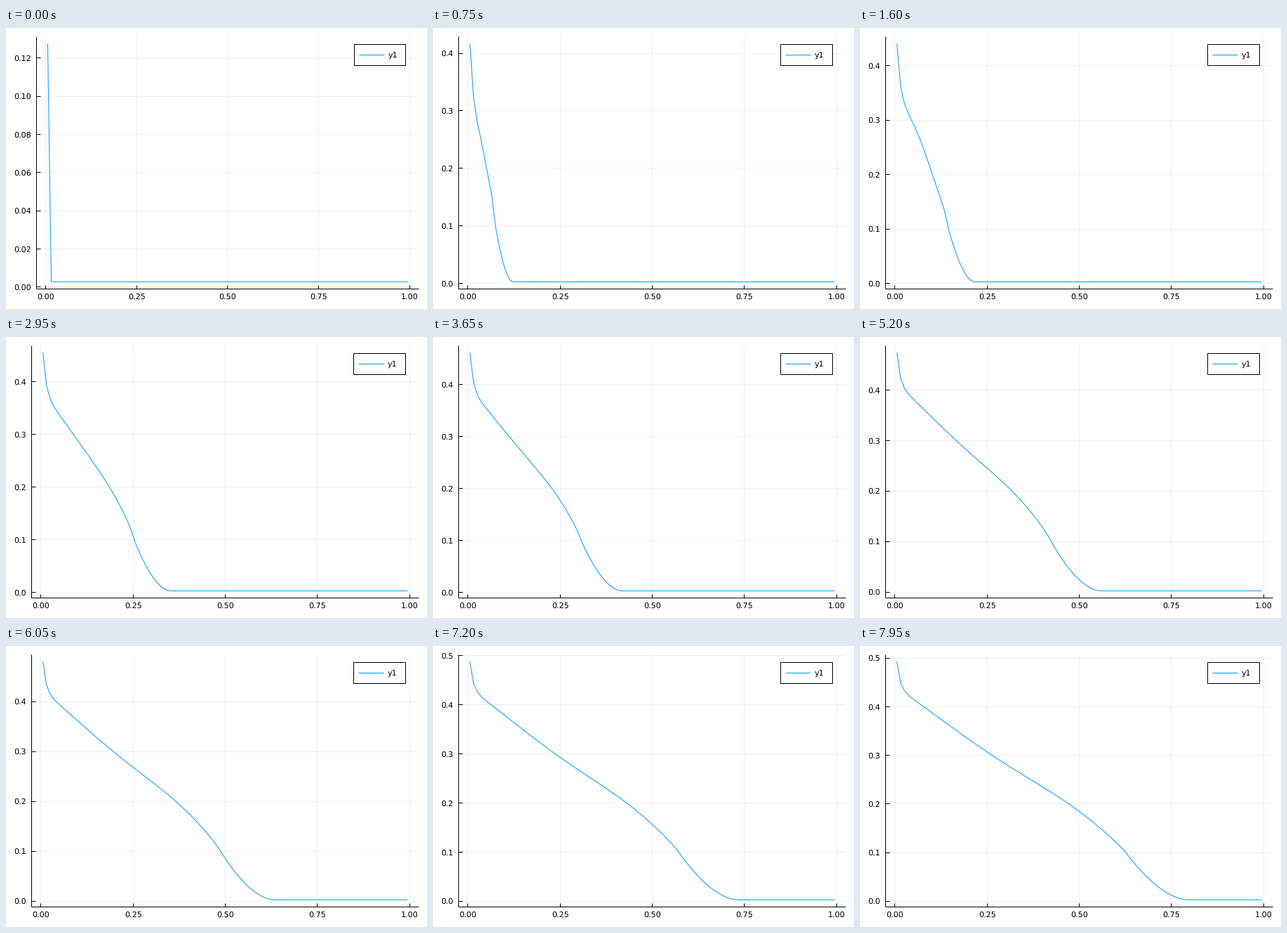
Write a matplotlib script that moves like this. It is 600 px wide and 400 px high and loops after 8 s.

```python
import numpy as np
import matplotlib.pyplot as plt
from matplotlib.animation import FuncAnimation
from matplotlib.collections import LineCollection
from matplotlib.patches import Rectangle

plt.rcParams["font.family"] = "DejaVu Sans"
plt.rcParams["text.hinting"] = "none"
W, H, DPI = 600, 400, 100
FRAMES = 160
PX = 72 / DPI
TOP, BOTTOM, RIGHT = 12, 371.5, 588
BLUE = "#009afa"
FLOOR = 0.00277   # resting height
KNEE = 0.1        # height where the body meets the toe
CELLS = (np.arange(100) + 0.5) / 100


def profile(n):
    """Fluid height per cell: inflow spike, sagging body, soft toe."""
    r = (n + 1) / 33
    peak = 0.4082 + 0.0328 * r ** 0.6 - 0.2847 * np.exp(-n / 4.8)
    front = 0.145 * r ** 0.927
    toe = 0.069 * r ** 0.565

    s = np.clip(CELLS / front, 0, 1)
    ripple = 0.022 - 0.05 / max(r, 1) ** 2
    shape = (1 - s) ** (0.73 * r ** 0.15) - ripple * np.sin(2 * np.pi * s ** 1.357)
    body = KNEE + (0.352 * r ** 0.144 - KNEE) * shape

    u = np.clip((CELLS - front) / toe, 0, 1)
    tail = FLOOR + (KNEE - FLOOR) * (1 - u) ** 1.75

    y = np.where(CELLS < front, body, tail)
    spike = (peak - y[0]) * 0.29 ** np.arange(len(y))
    y += spike * np.clip((y - FLOOR) / KNEE, 0, 1)
    y[0] = peak
    return y


fig = plt.figure(figsize=(W / DPI, H / DPI), dpi=DPI, facecolor="white")
ax = fig.add_axes([0, 0, 1, 1])
ax.set_xlim(0, W)
ax.set_ylim(H, 0)
ax.axis("off")


def add_lines(color, z):
    lines = LineCollection([], colors=color, linewidths=PX, zorder=z)
    return ax.add_collection(lines, autolim=False)


def add_curve(z):
    return ax.plot([], [], color=BLUE, lw=PX, zorder=z, solid_capstyle="butt")[0]


def add_text(ha, z=4):
    return ax.text(0, 0, "", fontsize=8, ha=ha, va="baseline", color="black", zorder=z)


grid = add_lines("#f0f0f0", 1)
axes = add_lines("black", 3)
curve = add_curve(2)
x_labels = [add_text("center") for _ in range(5)]
y_labels = [add_text("right") for _ in range(8)]
box = ax.add_patch(Rectangle((0, 23), 0, 30, fc="white", ec="black", lw=PX, zorder=5))
sample = add_curve(6)
name = add_text("left", 6)
name.set_text("y1")


def update(n):
    y = profile(n)
    lo, hi = y.min(), y.max()
    pad = 0.03 * (hi - lo)
    step = 0.02 if hi < 0.15 else 0.05 if hi < 0.3 else 0.1
    wide = step < 0.1
    left = 44 if wide else 37

    def to_x(v):
        return left + (v - CELLS[0] + 0.0297) / 1.0494 * (RIGHT - left)

    def to_y(v):
        return BOTTOM - (v - lo + pad) / (hi - lo + 2 * pad) * (BOTTOM - TOP)

    xt = np.linspace(0, 1, 5)
    yt = np.arange(0, hi + pad, step)
    gx, gy = to_x(xt), to_y(yt)
    sx, sy = left - 1, BOTTOM - 0.5   # axis lines, on whole pixels

    grid.set_segments([[(x, TOP), (x, sy)] for x in gx - 0.5]
                      + [[(sx, v), (RIGHT, v)] for v in gy - 0.5])
    axes.set_segments([[(sx, TOP), (sx, sy)], [(sx, sy), (RIGHT, sy)]]
                      + [[(x, sy), (x, sy - 5)] for x in gx - 0.5]
                      + [[(sx, v), (sx + 6, v)] for v in gy - 0.5])

    for label, x, v in zip(x_labels, gx, xt):
        label.set_position((x, 386))
        label.set_text(f"{v:.2f}")
    for i, label in enumerate(y_labels):
        shown = i < len(yt)
        label.set_visible(shown)
        if shown:
            label.set_position((left - 8, gy[i] + 4))
            label.set_text(f"{yt[i]:.{2 if wide else 1}f}")

    curve.set_data(to_x(CELLS), to_y(y))
    x0 = 496 if wide else 495
    box.set_x(x0)
    box.set_width(569 - x0)
    sample.set_data([x0 + 7, x0 + 43], [38, 38])
    name.set_position((x0 + 49, 42))
    return []


anim = FuncAnimation(fig, update, frames=FRAMES, interval=50, repeat=True,
                     repeat_delay=0, blit=False)
plt.show()
```
